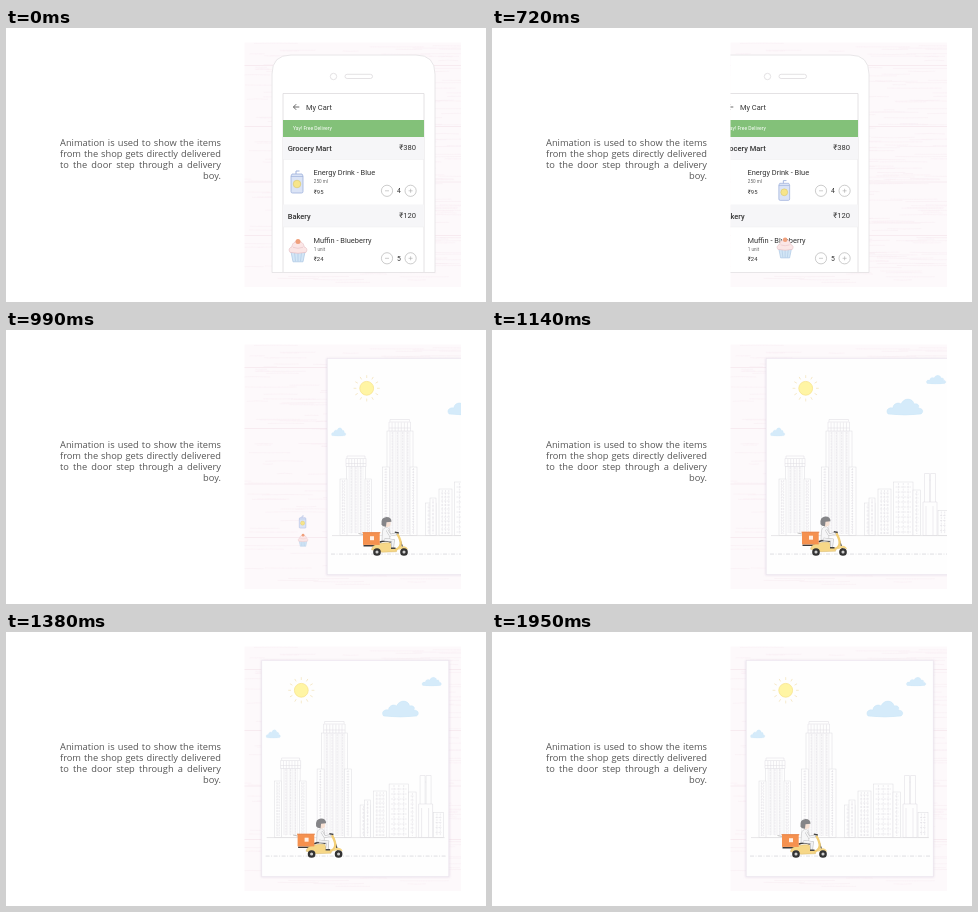
Recreate the animation shown at these times as an HTML page. Size 480 by 274 pixels, loop 1980 ms.

```html
<!DOCTYPE html>
<html lang="en">
<head>
<meta charset="utf-8">
<title>Delivery animation</title>
<style>
  html, body { margin: 0; width: 100%; height: 100%; overflow: hidden; background: #fff; }
  svg { position: absolute; left: 0; top: 0; width: 480px; height: 274px; }
  .copy { position: absolute; left: 54px; top: 109px; width: 161px; color: #555;
    font: 9.3px/11.1px "Open Sans", sans-serif; }
  .copy div { text-align: justify; text-align-last: justify; }
  .copy div:last-child { text-align: right; text-align-last: right; }
  svg text { font-family: Roboto, sans-serif; fill: #333; font-size: 7.45px; }
  svg .head { font-weight: 500; font-size: 7.5px; }
  svg .small { font-size: 4.6px; fill: #666; }
  svg .price { font-size: 5.9px; }
</style>
</head>
<body>
<div class="copy">
  <div>Animation is used to show the items</div>
  <div>from the shop gets directly delivered</div>
  <div>to the door step through a delivery</div>
  <div>boy.</div>
</div>
<svg viewBox="0 0 480 274" xmlns="http://www.w3.org/2000/svg">
  <defs>
    <clipPath id="frame"><rect x="238.5" y="14.5" width="216.5" height="244.5"/></clipPath>
    <filter id="soft" x="-10%" y="-10%" width="120%" height="120%"><feGaussianBlur stdDeviation="1.2"/></filter>
    <path id="cloud" d="M1 15C-2 11 2 8 6 9C6 4 12 3 14 5C17-2 26-1 27 5C31 4 33 7 31 9C36 9 37 13 34 15Q18 17 1 15Z" fill="#d5ebfa" stroke="#c9e4f6" stroke-width=".5"/>
  </defs>
  <g clip-path="url(#frame)">
    <rect x="238" y="14" width="218" height="246" fill="#fdf9fb"/>
    <g id="wood" fill="none"></g>

    <g id="phone">
      <path d="M266 244.500V46Q266 27 285 27H410Q429 27 429 46V244.500Z" fill="#fff" stroke="#e6e4e6" stroke-width=".9"/>
      <g fill="none" stroke="#dddbdd" stroke-width=".8">
        <circle cx="327.500" cy="48.500" r="3.200"/>
        <rect x="339" y="46.300" width="27.500" height="4.200" rx="2.100"/>
        <path d="M277 244V65.500H418V244"/>
      </g>
      <path d="M293.300 79H287.500M290.200 76.200L287.400 79L290.200 81.800" fill="none" stroke="#444" stroke-width=".8"/>
      <text x="300" y="81.500">My Cart</text>
      <rect x="277" y="92" width="141" height="17" fill="#83c179"/>
      <text x="287" y="102.300" style="font-size:5px;fill:#fff">Yay! Free Delivery</text>
      <g id="cart"></g>
    </g>

    <g id="can">
      <path d="M-1-7.500V-11H2.500" fill="none" stroke="#9fb2dc" stroke-width="1"/>
      <path d="M-5-8H5L6-6V9.500Q6 11 4.500 11H-4.500Q-6 11-6 9.500V-6Z" fill="#dbe4f6" stroke="#9fb2dc" stroke-width=".8"/>
      <path d="M-6-5.500H6" stroke="#9fb2dc" stroke-width=".7"/>
      <circle cy="2" r="3.800" fill="#f7e58a" stroke="#d9c66c" stroke-width=".6"/>
    </g>
    <g id="cake">
      <path d="M-7 1.500H7L5 11.500H-5Z" fill="#d3e6f6" stroke="#a9c5e2" stroke-width=".7"/>
      <path d="M-3.500 2L-2.500 11M0 2V11M3.500 2L2.500 11" stroke="#a9c5e2" stroke-width=".6"/>
      <path d="M-8 2C-10-1-8-3-6-3.500C-6-7-3-9 0-9C3-9 6-7 6-3.500C8-3 10-1 8 2Q0 4-8 2Z" fill="#fbe6e6" stroke="#e5bfc4" stroke-width=".7"/>
      <path d="M-5-3Q0-1 5-3" fill="none" stroke="#e5bfc4" stroke-width=".6"/>
      <circle cy="-8.800" r="2.500" fill="#f0a07c"/>
    </g>

    <g id="card">
      <rect x="253.500" y="28.300" width="188.500" height="217" fill="#ddd0e0" opacity=".6" filter="url(#soft)"/>
      <rect x="254.200" y="28.300" width="187" height="216.400" fill="#fefefe" stroke="#ece5ee" stroke-width=".6"/>
      <g id="sun">
        <circle cx="293.700" cy="58.300" r="6.900" fill="#fff5a4" stroke="#f8e48e" stroke-width=".8"/>
      </g>
      <use href="#cloud" x="375" y="69"/>
      <use href="#cloud" transform="translate(414.500 45.300) scale(.54)"/>
      <use href="#cloud" transform="translate(258.500 97.800) scale(.4 .52)"/>
      <g id="city" fill="#fefefe" stroke="#dcdbe0" stroke-width=".5"></g>
      <path d="M259 205.600H437" stroke="#dedde0" stroke-width=".7"/>
      <path d="M258 224.200H438" stroke="#ececee" stroke-width="1.800" stroke-dasharray="4 1.500 1 1.500"/>

      <g id="rider">
        <path d="M285.500 203.300L291 204.500" stroke="#b5b5b5" stroke-width=".8"/>
        <path d="M290.500 215.500H311" stroke="#3c3a3a" stroke-width="1.600"/>
        <path d="M327.500 211L331 221" stroke="#444" stroke-width="1.200"/>
        <path d="M298.500 219.500C299 215 304 212.500 317 212.500L319.500 218.300H324L323.500 221.500L309 222Z" fill="#f6d787" stroke="#cfae62" stroke-width=".4"/>
        <path d="M324.300 203.500Q328.500 211 327.500 214.500Q326.500 218.500 322 219.500" fill="none" stroke="#f3cf77" stroke-width="2.400"/>
        <path d="M325.500 219.500Q327 215.500 331 216Q334.500 216.800 335 219.500Q331 217.800 325.500 219.500Z" fill="#f6d787"/>
        <path d="M306.500 212Q312 209.800 318 211.800" fill="none" stroke="#3c3a3a" stroke-width="1.600"/>
        <path d="M309 210L309.500 201Q310.500 196.800 314.500 197Q317.500 198.500 317 205L316.500 211Z" fill="#f6f6f7" stroke="#b4b4b6" stroke-width=".5"/>
        <path d="M311.500 209.500L320 210.300L319.500 217.500" fill="none" stroke="#a0a0a2" stroke-width="3"/>
        <path d="M311.500 209.500L320 210.300L319.500 217.500" fill="none" stroke="#f2f2f3" stroke-width="2.200"/>
        <path d="M318 218H322.500" stroke="#444" stroke-width="1.600"/>
        <path d="M314 200L317 205L323.500 203.500" fill="none" stroke="#b8b8ba" stroke-width="2.300"/>
        <path d="M314 200L317 205L323 203.700" fill="none" stroke="#f6f6f7" stroke-width="1.500"/>
        <path d="M321.800 202L325.800 202.800" stroke="#444" stroke-width="1.300"/>
        <path d="M313 191H317.500V195Q315.500 197.500 312.500 196.700Z" fill="#f7e1d4"/>
        <path d="M308.500 194.500Q307.500 187.200 313.500 186.800Q318.500 187 318.500 191.500L313.500 192L313 196.500Q309.500 196.500 308.500 194.500Z" fill="#858588"/>
        <rect x="290" y="202.500" width="16.700" height="12.200" fill="#f5914f"/>
        <path d="M289.500 202.500H307.300" stroke="#e87f3f" stroke-width="1"/>
        <rect x="297" y="206" width="4" height="4" fill="#fff0e5"/>
      </g>
      <g fill="#cfcfcf" stroke="#333" stroke-width="2.300">
        <circle cx="304" cy="222" r="2.700"/><circle cx="331" cy="222" r="2.700"/>
      </g>
    </g>
  </g>
</svg>
<script>
const $ = id => document.getElementById(id);
const add = (id, html) => $(id).insertAdjacentHTML('beforeend', html);
const LOOP = 1980, STEP = 30, TRAVEL = 300;

// Wood grain
let seed = 7;
const rnd = () => (seed = seed * 16807 % 2147483647) / 2147483647;
let grain = '';
for (let i = 0; i < 220; i++) {
  const x = 232 + rnd() * 210, y = 15 + rnd() * 243, w = 10 + rnd() * 55;
  grain += `M${x} ${y}q${w / 2} ${rnd() * 2 - 1} ${w} 0`;
}
add('wood', `<path d="${grain}" stroke="#f8edf3" stroke-width=".9" opacity=".6"/>
  <path d="M238 37.500H456M238 98.500H456M238 154H456M238 207.500H456" stroke="#f6eaf0" stroke-width=".9"/>`);

// Cart sections
const section = (y, shop, total, item, size, price, count) => {
  const cy = y + 53.8;
  const ring = (x, d) => `<circle cx="${x}" cy="${cy}" r="5.600"/><path d="${d}"/>`;
  add('cart', `<rect x="277" y="${y}" width="141" height="22.500" fill="#f6f6f8"/>
    <path d="M277 ${y + 22.5}H418" stroke="#ececef" stroke-width=".5"/>
    <text class="head" x="281.700" y="${y + 14.3}">${shop}</text>
    <text x="410" y="${y + 13.4}" text-anchor="end" style="font-size:7.600px">₹${total}</text>
    <text x="307.500" y="${y + 38.3}">${item}</text>
    <text class="small" x="307.800" y="${y + 46}">${size}</text>
    <text class="price" x="307.800" y="${y + 56.6}">₹${price}</text>
    <text x="392.800" y="${y + 56.3}" text-anchor="middle" style="font-size:6.800px">${count}</text>
    <g fill="none" stroke="#aaa" stroke-width=".6">
      ${ring(381, `M379 ${cy}h4`)}${ring(404.6, `M402.600 ${cy}h4m-2 -2v4`)}</g>`);
};
section(109, 'Grocery Mart', 380, 'Energy Drink - Blue', '250 ml', 95, 4);
section(176.5, 'Bakery', 120, 'Muffin - Blueberry', '1 unit', 24, 5);

// Sun rays
for (let i = 0; i < 12; i++)
  add('sun', `<path d="M293.700 48v-2.800" stroke="#f3e2b8" stroke-width=".7" transform="rotate(${i * 30} 293.700 58.300)"/>`);

// Skyline
const block = (x, y, w, gap = 3, cols = 3) => {
  let lines = '';
  for (let r = y + gap; r < 204; r += gap) lines += `M${x + 2} ${r}H${x + w - 2}`;
  for (let c = 1; c < cols; c++) lines += `M${x + w * c / cols} ${y + 1}V204`;
  add('city', `<rect x="${x}" y="${y}" width="${w}" height="${205.5 - y}"/>
    <path d="${lines}" fill="none" stroke-dasharray="2 .8"/>`);
};
const crown = (x, y, w, h) => {
  let bars = '';
  for (let i = 1; i < 7; i++) bars += `M${x + w * i / 7} ${y + 3}V${y + h}`;
  add('city', `<path d="M${x + 1} ${y + 2}V${y}H${x + w - 1}V${y + 2}M${x} ${y + 2.5}H${x + w}V${y + h}H${x}ZM${x} ${y + h - 3}H${x + w}${bars}"/>`);
};
block(273.5, 136, 19, 2, 4);
block(267, 149, 7);
block(292, 149, 6.5);
crown(273, 126, 20, 10.5);
block(314, 101, 26, 2, 5);
block(309.5, 137, 7, 2.6, 2);
block(337, 137, 7, 2.6, 2);
crown(316, 89.5, 21.5, 11.5);
block(352.500, 173, 10.5, 4, 3);
block(357, 168, 6, 4, 2);
block(366, 159, 13, 4, 4);
block(381.5, 152, 19.5, 5, 4);
block(401, 160, 7.5, 4, 2);
add('city', '<path d="M411 205.500V172H425V205.500ZM412.500 172V143.500H417.500V172M418.500 172V143.500H423.500V172M417.500 150H418.500M414 205V176M421 205V176"/>');
block(426, 180.5, 10, 5, 3);

// Time, position and speed of the slide
const keys = [[495, 0, 0], [720, 52, .55], [990, 233, .52], [1140, 280, .17], [1380, 298.4, .016], [1545, 300, 0]];
const slide = t => {
  if (t <= keys[0][0]) return 0;
  const i = keys.findIndex(k => k[0] > t);
  if (i < 0) return TRAVEL;
  const [t0, p0, v0] = keys[i - 1], [t1, p1, v1] = keys[i];
  const d = t1 - t0, u = (t - t0) / d, w = 1 - u;
  return w * w * (1 + 2 * u) * p0 + u * u * (3 - 2 * u) * p1 + u * w * d * (w * v0 - u * v1);
};
const move = (id, x, y, s = 1) => $(id).setAttribute('transform', `translate(${x} ${y}) scale(${s})`);

function draw(time) {
  const t = Math.floor(time % LOOP / STEP) * STEP;
  const pos = slide(t), p = pos / TRAVEL, size = 1 - .58 * p;
  move('phone', -pos, 0);
  move('card', TRAVEL - pos, 0);
  move('can', 291 + 7.2 * p, 154 + 49 * p, size);
  move('cake', 292 + 6.5 * p, 222.3 - 15.8 * p, size);
  move('rider', 0, .3 * Math.sin(t / 240 * Math.PI * 2));
}

let start;
function tick(now) {
  start ??= now;
  draw(now - start);
  requestAnimationFrame(tick);
}
draw(0);
requestAnimationFrame(tick);
</script>
</body>
</html>
```
